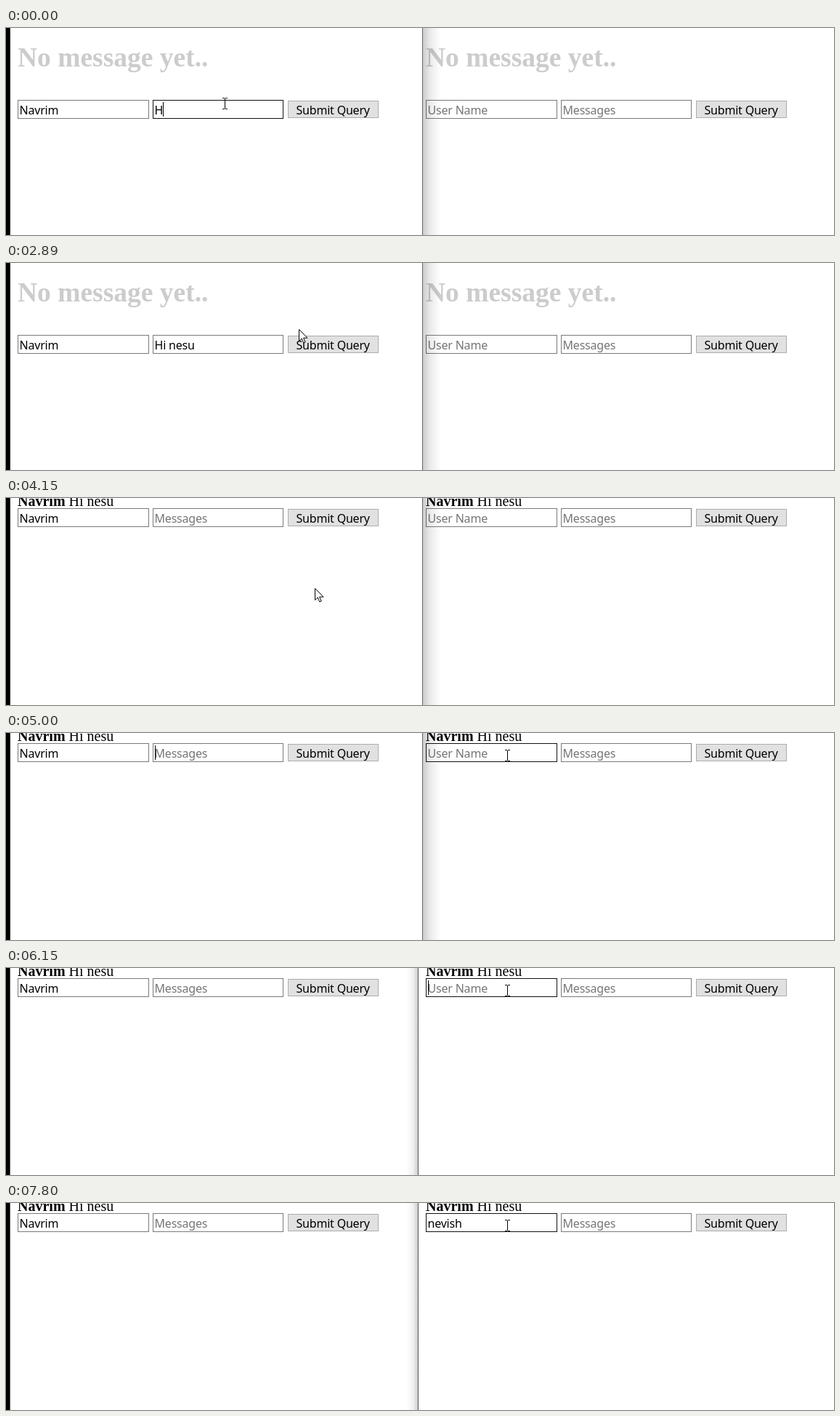
Recreate the animation shown at these times as an HTML page. Size 1140x285 px, loop 8000 ms.

```html
<!DOCTYPE html>
<html lang="en">
<head>
<meta charset="utf-8">
<title>Two chat windows</title>
<style>
  html, body { margin: 0; width: 100%; height: 100%; overflow: hidden; background: #fff; }
  svg { display: block; width: 1140px; height: 285px; }
  text { white-space: pre; }
  .title { font: bold 37.5px "Liberation Serif", "Times New Roman", serif; fill: #ccc; }
  .msg { font: 20px "Liberation Serif", "Times New Roman", serif; }
  .msg tspan { font-weight: bold; }
  .ui { font: 16px "Noto Sans", "Open Sans", sans-serif; letter-spacing: -.2px; }
</style>
</head>
<body>
<svg viewBox="0 0 1140 285">
  <defs>
    <linearGradient id="toRight">
      <stop offset="0" stop-opacity=".2"/>
      <stop offset=".4" stop-opacity=".08"/>
      <stop offset="1" stop-opacity="0"/>
    </linearGradient>
    <linearGradient id="toLeft">
      <stop offset="0" stop-opacity="0"/>
      <stop offset=".6" stop-opacity=".06"/>
      <stop offset="1" stop-opacity=".2"/>
    </linearGradient>
  </defs>
  <rect width="1140" height="285" fill="#fff"/>
  <rect width="5" height="285"/>
  <rect id="edge" x="5" width="1" height="285"/>
  <g id="panes"></g>
  <g id="leftOnTop">
    <rect x="573" width="1" height="285" fill="#666"/>
    <rect x="574" width="25" height="285" fill="url(#toRight)"/>
  </g>
  <g id="rightOnTop">
    <rect x="551" width="16" height="285" fill="url(#toLeft)"/>
    <rect x="567" width="1" height="285" fill="#5a5a5a"/>
  </g>
  <circle id="click" r="15" fill="#f0f032"/>
  <path id="arrow" d="M.5 .5V16.5L4.2 13L6.8 19L9.2 18L6.6 12.2H12Z" fill="#fff" stroke="#000"/>
  <path id="beam" d="M-3 -7.5H0M1 -7.5H4M-3 7.5H0M1 7.5H4M.5 -7V7" fill="none" stroke="#000"/>
</svg>
<script>
const LOOP = 8000, SAMPLE = 90;
const SENDER = "Navrim", GREETING = "Hi nesu", REPLIER = "nevish";
const PRESS = 3830, SENT = 4010, SWITCH = 5150, CLICK = 170;
// Pointer stops: time, x, y
const STOPS = [[2500, 301, 104], [2880, 403, 91], [3420, 410, 113], [4010, 410, 113], [4190, 428, 127], [4770, 690, 31]];
const $ = id => document.getElementById(id);

function add(parent, tag, attrs, text = "") {
  const node = document.createElementNS("http://www.w3.org/2000/svg", tag);
  for (const key in attrs) node.setAttribute(key, attrs[key]);
  node.textContent = text;
  return parent.appendChild(node);
}
const show = (node, on) => node.setAttribute("display", on ? "inline" : "none");
const move = (node, x, y) => node.setAttribute("transform", `translate(${x} ${y})`);
const clamp = (v, low, high) => Math.min(high, Math.max(low, v));
const ease = p => p * p * (3 - 2 * p);
const typed = (t, start, gap) => Math.max(0, Math.floor((t - start) / gap) + 1);
const blink = (t, half) => t >= 0 && Math.floor(t / half) % 2 === 0;

function pointerAt(t) {
  const now = Math.floor(t / SAMPLE) * SAMPLE;
  let [from, x, y] = STOPS[0];
  for (const [to, nextX, nextY] of STOPS.slice(1)) {
    const p = ease(clamp((now - from) / (to - from), 0, 1));
    x += (nextX - x) * p;
    y += (nextY - y) * p;
    from = to;
  }
  return [Math.round(x), Math.round(y)];
}

function makeField(form, x, width, hint) {
  const box = add(form, "rect", { x: x + .5, y: .5, width: width - 1, height: 25, fill: "#fff" });
  const label = add(form, "text", { x: x + 2.5, y: 20, class: "ui" });
  const caret = add(form, "rect", { y: 3, width: 1, height: 20 });
  return (value, hover, caretOn) => {
    box.setAttribute("stroke", hover ? "#111" : "#7a7a7a");
    label.textContent = value || hint;
    label.setAttribute("fill", value ? "#000" : "#757575");
    show(caret, caretOn);
    const length = value ? label.getComputedTextLength() : 0;
    caret.setAttribute("x", Math.round(x + 2.5 + length));
  };
}

function makeButton(form) {
  const looks = {
    idle: ["#e1e1e1", "#adadad"],
    hover: ["#e5f1fb", "#0078d7"],
    down: ["#cce4f7", "#005499"]
  };
  const box = add(form, "rect", { x: 372.5, y: 1.5, width: 124, height: 23 });
  const label = add(form, "text", { y: 20, class: "ui" }, "Submit Query");
  return look => {
    box.setAttribute("fill", looks[look][0]);
    box.setAttribute("stroke", looks[look][1]);
    label.setAttribute("x", look === "down" ? 384.5 : 383.5);
  };
}

function makePane(paneX) {
  const pane = add($("panes"), "g", { transform: `translate(${paneX} 0)` });
  const title = add(pane, "text", { y: 53, class: "title" }, "No message yet..");
  const msg = add(pane, "text", { y: 10.5, class: "msg" });
  add(msg, "tspan", {}, SENDER);
  msg.append(" " + GREETING);
  const form = add(pane, "g", {});
  return {
    name: makeField(form, 0, 181, "User Name"),
    message: makeField(form, 186, 180, "Messages"),
    button: makeButton(form),
    layout(sent) {
      show(title, !sent);
      show(msg, sent);
      move(form, 0, sent ? 14 : 99);
    },
    // Which control lies under a point
    under(x, y, sent) {
      const dx = x - paneX, dy = y - (sent ? 14 : 99);
      if (dx < 0 || dx > 497 || dy < 0 || dy > 26) return "";
      return dx < 181 ? "name" : dx < 366 ? "message" : "button";
    }
  };
}

const left = makePane(16), right = makePane(578);

function draw(t) {
  const sent = t >= SENT, switched = t >= SWITCH;
  const [x, y] = pointerAt(t);
  const onLeft = left.under(x, y, sent), onRight = right.under(x, y, sent);
  const pressed = t >= PRESS && t < PRESS + CLICK / 2;

  const letters = t < 320 ? 1 : 2 + typed(t, 630, 270);
  const leftFocus = t < PRESS || (sent && !switched);
  left.layout(sent);
  left.name(SENDER, onLeft === "name", false);
  left.message(sent ? "" : GREETING.slice(0, letters), onLeft === "message", leftFocus && blink(t, 565));
  left.button(pressed ? "down" : onLeft === "button" ? "hover" : "idle");

  right.layout(sent);
  right.name(REPLIER.slice(0, typed(t, 6700, 200)), onRight === "name", blink(t - SWITCH, 500));
  right.message("", onRight === "message", false);
  right.button("idle");

  show($("leftOnTop"), !switched);
  show($("rightOnTop"), switched);
  $("edge").setAttribute("fill", switched ? "#555" : "#222");

  const overText = /name|message/.test(onLeft + onRight);
  show($("beam"), overText);
  show($("arrow"), !overText);
  move($(overText ? "beam" : "arrow"), x, y);

  const age = t - (switched ? SWITCH : PRESS);
  show($("click"), age >= 0 && age < CLICK);
  $("click").setAttribute("opacity", age < CLICK / 2 ? .62 : .35);
  move($("click"), x, y);
}

function tick() {
  draw(performance.now() % LOOP);
  requestAnimationFrame(tick);
}
tick();
</script>
</body>
</html>
```
